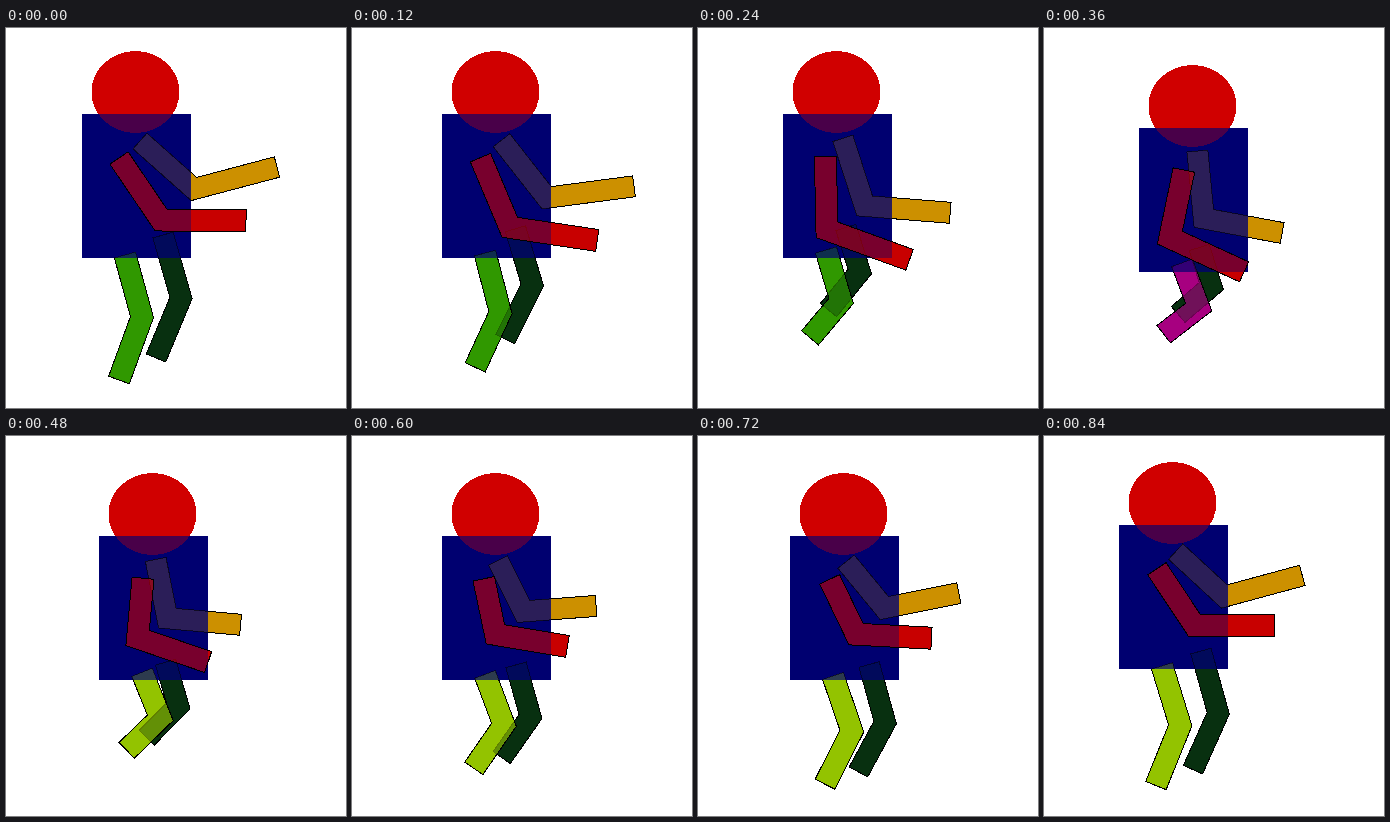
These frames come from a looping animation (340x380 px, 0.96 s). An HTML page:

```html
<!DOCTYPE html>
<html lang="en">
<head>
<meta charset="utf-8">
<title>Walk cycle</title>
<style>
  html, body { margin: 0; width: 100%; height: 100%; overflow: hidden; background: #fff; }
  svg { display: block; width: 100%; height: 100%; shape-rendering: crispEdges; }
</style>
</head>
<body>
<svg viewBox="0 0 340 380">
  <defs>
    <rect id="body" width="109" height="144" fill="#000070"/>
    <ellipse id="head" cx="53.5" cy="-22" rx="44" ry="41" fill="#d00000"/>
    <polygon id="backArm" fill="#cc9000" stroke="#000"/>
    <polygon id="frontArm" fill="#c80000" stroke="#000"/>
    <polygon id="backLeg" fill="#083010" stroke="#000"/>
    <polygon id="frontLeg" stroke="#000"/>
    <clipPath id="torso"><use href="#body"/></clipPath>
  </defs>
  <g id="walker">
    <use href="#frontLeg"/>
    <use href="#backLeg"/>
    <use href="#frontLeg" fill-opacity=".65"/>
    <use href="#head"/>
    <use href="#backArm"/>
    <use href="#frontArm"/>
    <use href="#body"/>
    <!-- parts showing faintly through the torso -->
    <g clip-path="url(#torso)">
      <use href="#backLeg" fill-opacity=".22" stroke-opacity=".5"/>
      <use href="#frontLeg" fill-opacity=".3" stroke-opacity=".5"/>
      <use href="#head" fill-opacity=".35"/>
      <use href="#backArm" fill-opacity=".21" stroke-opacity=".6"/>
      <use href="#frontArm" fill-opacity=".6"/>
    </g>
  </g>
</svg>
<script>
const STEP = 120;
const $ = id => document.getElementById(id);

// Torso corner at each step of the walk.
const path = [[76, 86], [90, 86], [85, 86], [95, 100], [93, 100], [90, 100], [92, 100], [75, 89]];

// Every joint circles a centre on an ellipse, measured from the torso corner:
// [centre x, y, cosine x, y, sine x, y]
const limbs = {
  backArm: {
    width: 21,
    joints: [[58, 25, 0, 2, 2, 0], [88, 82, 24, -7, 2, 8], [168, 78, 27, -25, 9, 13]]
  },
  frontArm: {
    width: 22,
    joints: [[41, 43, -4, 1, 0, 0], [55, 107, 24, -1, -3, 9], [134, 124, 30, -17, 3, 17]]
  },
  backLeg: {
    width: 21,
    joints: [[71, 121, 10, 0, -5, -8], [86, 172, 13, 12, -5, -11], [57, 216, 17, 28, -6, -11]]
  },
  frontLeg: {
    width: 22,
    joints: [[43, 138, 0, 3, 0, -1], [60, 191, 0, 12, -2, 0], [31, 236, 6, 30, -2, -2]]
  }
};

function normal([ax, ay], [bx, by]) {
  const len = Math.hypot(bx - ax, by - ay);
  return [(ay - by) / len, (bx - ax) / len];
}

// Outline of a two-bone limb, mitred at the middle joint.
function outline([a, b, c], width) {
  const n = normal(a, b), m = normal(b, c);
  const k = 1 / (1 + n[0] * m[0] + n[1] * m[1]);
  const mitre = [(n[0] + m[0]) * k, (n[1] + m[1]) * k];
  const side = r => [[a, n], [b, mitre], [c, m]].map(([p, d]) => [p[0] + d[0] * r, p[1] + d[1] * r]);
  return [...side(-width / 2), ...side(width / 2).reverse()].join(" ");
}

function draw(step) {
  // The swing runs slower near the stretched pose than near the tucked one.
  const turn = step / path.length * 2 * Math.PI;
  const phase = turn + 0.35 * (1 - Math.cos(turn));
  const cos = Math.cos(phase), sin = Math.sin(phase);
  const orbit = ([x, y, cx, cy, sx, sy]) => [x + cx * cos + sx * sin, y + cy * cos + sy * sin];

  $("walker").setAttribute("transform", `translate(${path[step]})`);
  for (const id in limbs) {
    const { joints, width } = limbs[id];
    $(id).setAttribute("points", outline(joints.map(orbit), width));
  }
  $("frontLeg").setAttribute("fill", step < 3 ? "#309800" : step === 3 ? "#a80080" : "#94c400");
}

const start = performance.now();
function tick() {
  draw(Math.floor((performance.now() - start) / STEP) % path.length);
  requestAnimationFrame(tick);
}
tick();
</script>
</body>
</html>
```
